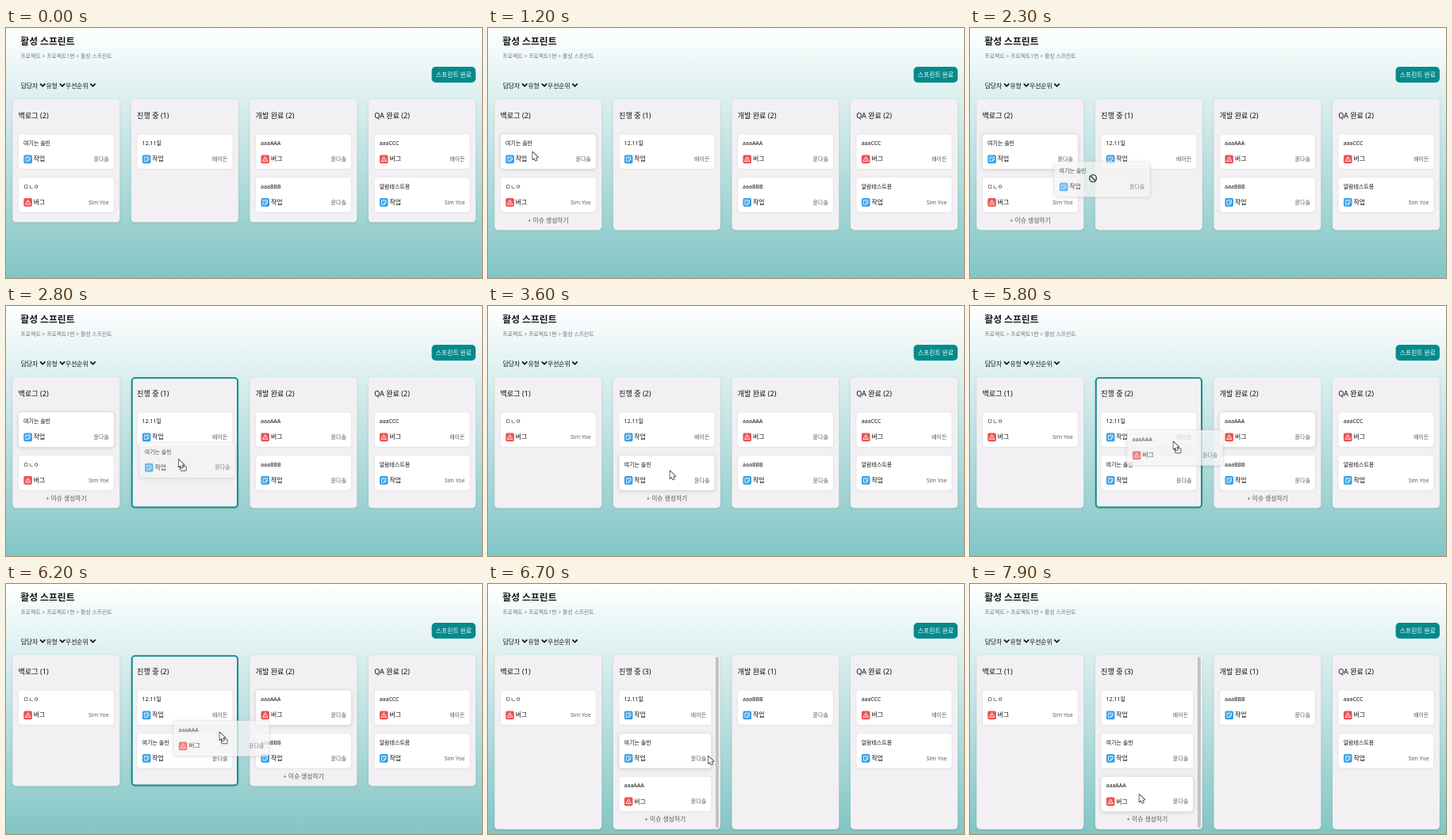
Animation, 600 px wide and 316 px high, one loop 8000 ms. Source, as an HTML page with a canvas:

```html
<!DOCTYPE html>
<html lang="ko">
<head>
<meta charset="utf-8">
<title>활성 스프린트</title>
<style>
html, body { margin: 0; width: 100%; height: 100%; overflow: hidden; }
canvas { display: block; width: 600px; height: 316px; }
</style>
</head>
<body>
<canvas id="stage"></canvas>
<script>
const W = 600, H = 316, LOOP = 8000, STEP = 100;
const TEAL = '#058a8b', BLUE = '#379fe5', RED = '#eb5357';
const FONT = '"Noto Sans", "Noto Sans CJK KR", "Noto Sans CJK JP", "Noto Sans CJK", sans-serif';
const COL = { x: 8.3, y: 90, w: 135, gap: 149.55 };
const CARD = { x: 7.2, y: 134, w: 120.8, h: 44.5, gap: 54.6 };

const canvas = document.getElementById('stage');
const ctx = canvas.getContext('2d');
const dpr = window.devicePixelRatio || 1;
canvas.width = W * dpr;
canvas.height = H * dpr;

const card = (title, bug, owner) => ({ title, bug, owner });
const A = '윤다솔', B = '배이든', C = 'Sim Yoe';
const place = card('여기는 솔빈', false, A);
const jamo = card('ㅁㄴㅇ', true, C);
const day = card('12.11일', false, B);
const a = card('aaaAAA', true, A);
const b = card('aaaBBB', false, A);
const c = card('aaaCCC', true, B);
const alarm = card('알람테스트용', false, C);

const names = ['백로그', '진행 중', '개발 완료', 'QA 완료'];
const drags = [
  { from: 1500, to: 3000, item: place, col: 0, dx: 49, dy: 21 },
  { from: 5400, to: 6600, item: a, col: 2, dx: 58, dy: 14 }
];

// The pointer eases from stop to stop, with an optional upward arc
const entry = { time: 600, x: 102, y: 238 };
const move = (from, to, x, y, arc = 0) => ({ from, to, x, y, arc });
const moves = [
  move(500, 1300, 54, 153),
  move(1400, 2300, 155, 190),
  move(2300, 3100, 245, 195),
  move(3500, 3600, 229, 208),
  move(3600, 4000, 240, 195),
  move(4400, 5100, 342.5, 157, 62),
  move(5100, 5600, 394, 156),
  move(5600, 5900, 210, 176),
  move(5900, 6200, 269, 187),
  move(6200, 7100, 283, 238),
  move(7100, 7900, 213, 265.5)
];

const mix = (p, q, k) => p + (q - p) * k;
const clamp = k => Math.min(1, Math.max(0, k));
const ease = k => (1 - Math.cos(Math.PI * k)) / 2;

function pointerAt(t) {
  if (t < entry.time) return null;
  let { x, y } = entry;
  for (const m of moves) {
    const k = ease(clamp((t - m.from) / (m.to - m.from)));
    x = mix(x, m.x, k);
    y = mix(y, m.y, k) - m.arc * Math.sin(Math.PI * k);
  }
  return { x, y };
}

function boardAt(t) {
  const first = t < drags[0].to, second = t < drags[1].to;
  return [
    first ? [place, jamo] : [jamo],
    [day, ...(first ? [] : [place]), ...(second ? [] : [a])],
    second ? [a, b] : [b],
    [c, alarm]
  ];
}

const colX = i => COL.x + i * COL.gap;
const cardY = i => CARD.y + i * CARD.gap;

function text(s, x, y, size, color, align = 'left', weight = 400) {
  ctx.font = `${weight} ${size}px ${FONT}`;
  ctx.fillStyle = color;
  ctx.textAlign = align;
  ctx.fillText(s, x, y);
}

function box(x, y, w, h, r) {
  ctx.beginPath();
  ctx.roundRect(x, y, w, h, r);
}

function fillShadow(fill, alpha, blur, dy) {
  ctx.save();
  ctx.shadowColor = `rgba(0,0,0,${alpha})`;
  ctx.shadowBlur = blur * dpr;
  ctx.shadowOffsetY = dy * dpr;
  ctx.fillStyle = fill;
  ctx.fill();
  ctx.restore();
}

function line(color, width, points, close) {
  ctx.beginPath();
  points.forEach(([x, y]) => ctx.lineTo(x, y));
  if (close) ctx.closePath();
  ctx.strokeStyle = color;
  ctx.lineWidth = width;
  ctx.stroke();
}

function drawIcon(x, y, bug) {
  ctx.save();
  box(x, y, 10.6, 10.8, 2);
  ctx.fillStyle = bug ? RED : BLUE;
  ctx.fill();
  ctx.translate(x + 5.3, y + 5.4);
  ctx.lineJoin = 'round';
  if (bug) {
    line('#fff', 0.8, [[0, -3.1], [3.3, 2.6], [-3.3, 2.6]], true);
    line('#fff', 0.8, [[0, -1], [0, 0.6]]);
    line('#fff', 0.8, [[0, 1.2], [0, 1.9]]);
  } else {
    line('#fff', 0.8, [[-2.8, -2.8], [2.8, -2.8], [2.8, 0.6], [0.6, 2.8], [-2.8, 2.8]], true);
    line('#fff', 0.8, [[2.8, 0.6], [0.6, 0.6], [0.6, 2.8]]);
    line('#fff', 0.6, [[-1.4, -1.2], [1.4, -1.2]]);
  }
  ctx.restore();
}

function drawCard(item, x, y, w, hover) {
  box(x, y, w, CARD.h, 4);
  if (hover) fillShadow('#fff', 0.16, 4, 0.8);
  else fillShadow('#fff', 0.07, 1.5, 0.4);
  ctx.strokeStyle = hover ? '#dedce0' : '#e4e2e6';
  ctx.lineWidth = 0.7;
  ctx.stroke();
  text(item.title, x + 6.5, y + 14.2, 7, '#111', 'left', 500);
  drawIcon(x + 6.8, y + 26.4, item.bug);
  text(item.bug ? '버그' : '작업', x + 19.3, y + 34.4, 7.9, '#111', 'left', 500);
  text(item.owner, x + w - 6.5, y + 34, 7, '#5a5e62', 'right');
}

function drawHeader() {
  const g = ctx.createLinearGradient(0, 0, 0, H);
  g.addColorStop(0, '#ffffff');
  g.addColorStop(1, '#82c5c5');
  ctx.fillStyle = g;
  ctx.fillRect(0, 0, W, H);

  text('활성 스프린트', 18.3, 21.3, 11.8, '#111', 'left', 700);
  text('프로젝트 > 프로젝트1번 > 활성 스프린트', 18.5, 38.2, 6.85, '#6a757e');
  const filters = [['담당자', 18.7, 46.2], ['유형', 50.4, 71], ['우선순위', 75, 109.5]];
  for (const [label, x, cx] of filters) {
    text(label, x, 75.6, 7.8, '#111', 'left', 500);
    line('#111', 1.7, [[cx - 3.2, 70.4], [cx, 73.6], [cx + 3.2, 70.4]]);
  }
  box(536.6, 49.1, 55.4, 19.8, 5);
  ctx.fillStyle = TEAL;
  ctx.fill();
  text('스프린트 완료', 564.4, 61.9, 7.8, '#fff', 'center');
}

function drawColumn(i, items, h, state) {
  const x = colX(i), scroll = items.length > 2;
  const w = CARD.w - (scroll ? 4.2 : 0);
  box(x, COL.y, COL.w, h, 4.5);
  fillShadow('#f2f0f2', 0.14, 2.5, 0.7);
  if (state.target === i) {
    box(x + 0.9, COL.y + 0.9, COL.w - 1.8, h - 1.8, 4);
    ctx.strokeStyle = TEAL;
    ctx.lineWidth = 1.9;
    ctx.stroke();
  }
  text(`${names[i]} (${items.length})`, x + 7.2, 114.3, 9.1, '#111', 'left', 500);
  items.forEach((item, k) => drawCard(item, x + CARD.x, cardY(k), w, item === state.lit));
  if (state.hover === i) {
    text('+ 이슈 생성하기', x + CARD.x + w / 2, cardY(items.length - 1) + 57.2, 7.8, '#555557', 'center');
  }
  if (scroll) {
    box(x + 129, COL.y + 2, 4, h - 4, 2);
    ctx.fillStyle = '#c3c1c3';
    ctx.fill();
  }
}

function drawArrow(x, y, copy) {
  ctx.save();
  ctx.translate(x, y);
  ctx.lineJoin = 'round';
  ctx.fillStyle = '#fff';
  if (copy) {
    box(2.5, 9, 7.5, 5.8, 1);
    ctx.fill();
    ctx.strokeStyle = '#111';
    ctx.stroke();
  }
  const shape = [[0.4, 0.5], [0.4, 10], [2.6, 8], [4.1, 11.5], [5.9, 10.7], [4.4, 7.3], [7.4, 7.2]];
  line('#111', 1.3, shape, true);
  ctx.fill();
  ctx.restore();
}

function drawBlocked(x, y) {
  for (const [color, width] of [['#fff', 2.8], ['#444', 1.5]]) {
    ctx.strokeStyle = color;
    ctx.lineWidth = width;
    ctx.beginPath();
    ctx.arc(x, y, 4.4, 0, Math.PI * 2);
    ctx.moveTo(x - 3.1, y - 3.1);
    ctx.lineTo(x + 3.1, y + 3.1);
    ctx.stroke();
  }
}

function cardUnder(p, col, items) {
  const x = colX(col) + CARD.x;
  if (p.x < x || p.x > x + CARD.w) return null;
  return items.find((_, k) => p.y >= cardY(k) && p.y <= cardY(k) + CARD.h);
}

function drawGhost(drag, p) {
  ctx.save();
  ctx.globalAlpha = 0.72;
  drawCard(drag.item, p.x - drag.dx, p.y - drag.dy, CARD.w, true);
  ctx.restore();
}

function draw(t) {
  ctx.setTransform(dpr, 0, 0, dpr, 0, 0);
  const p = pointerAt(t), board = boardAt(t);
  const drag = drags.find(d => t >= d.from && t < d.to);
  const over = p ? board.findIndex((_, i) => p.x >= colX(i) && p.x <= colX(i) + COL.w) : -1;
  const state = {
    hover: drag ? drag.col : over,
    target: drag ? over : -1,
    lit: drag ? drag.item : over >= 0 ? cardUnder(p, over, board[over]) : null
  };
  const h = Math.max(...board.map((items, i) =>
    cardY(items.length - 1) + CARD.h + (state.hover === i ? 22.3 : 12.4) - COL.y));

  drawHeader();
  board.forEach((items, i) => drawColumn(i, items, h, state));
  if (!p) return;
  if (drag) drawGhost(drag, p);
  if (drag && over < 0) drawBlocked(p.x, p.y);
  else drawArrow(p.x, p.y, !!drag);
}

const start = performance.now();
function tick() {
  const t = (performance.now() - start) % LOOP;
  draw(Math.floor(t / STEP) * STEP);
  requestAnimationFrame(tick);
}
tick();
</script>
</body>
</html>
```
